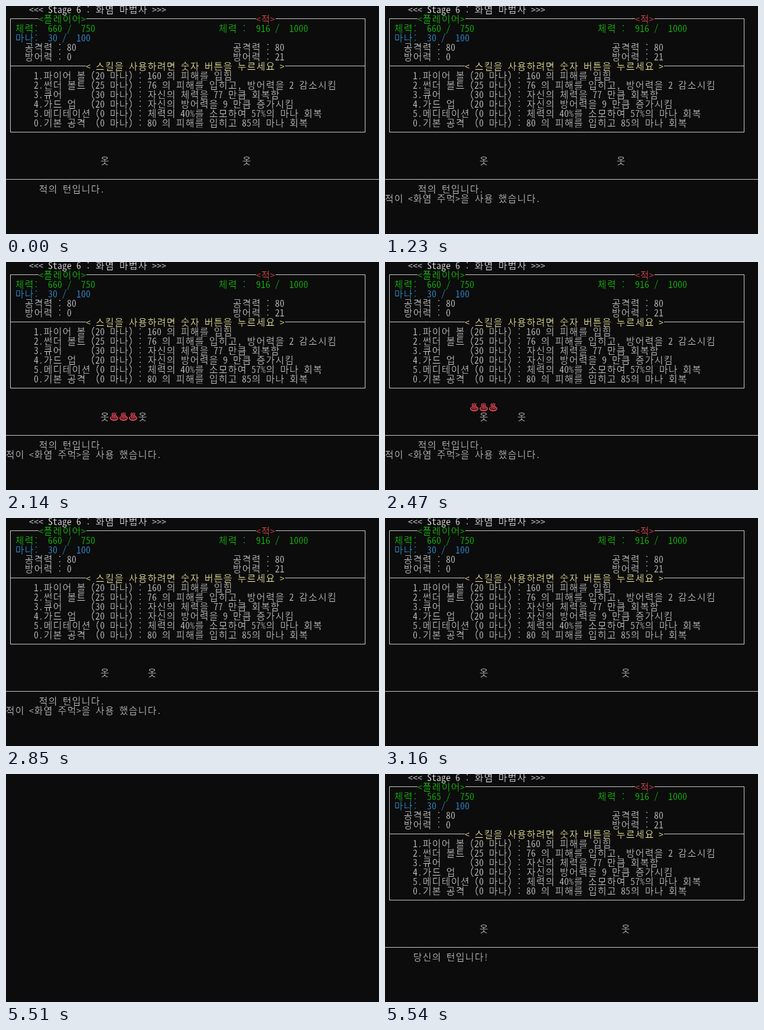
Animation, 631 px wide and 386 px high, one loop 5930 ms. Source, as an HTML page:

```html
<!DOCTYPE html>
<html lang="ko">
<head>
<meta charset="utf-8">
<title>Stage 6</title>
<style>
html, body { margin: 0; width: 100%; height: 100%; overflow: hidden; background: #0c0c0c; }
svg { display: block; }
text {
  font: 300 16px "Noto Sans Mono CJK KR", "Noto Sans CJK KR", "Noto Sans CJK", "Noto Sans Mono", monospace;
  text-anchor: middle;
  white-space: pre;
  stroke: #0c0c0c; /* thins the strokes to console weight */
  stroke-width: .25;
}
.flame { stroke: #e74856; stroke-width: .6; }
path { fill: none; stroke: #ccc; shape-rendering: crispEdges; }
</style>
</head>
<body>
<svg width="631" height="386" viewBox="0 0 631 386">
  <g id="screen">
    <path d="M7.5 213V21.5H55M136 21.5H423M456 21.5H607.5V213.5H7M8 101.5H135M472 101.5H607M0 293.5H631"/>
  </g>
</svg>
<script>
const CELL = 8, ROW = 16, LEFT = -1, BASELINE = 12, LOOP = 5930;
const GREY = '#cccccc', WHITE = '#f2f2f2', GREEN = '#16c60c', RED = '#e74856', BLUE = '#3a96dd', YELLOW = '#f9f1a5';
const screen = document.getElementById('screen');

// Console text: Latin takes one cell, Hangul and symbols take two.
function put(col, row, string, color = GREY) {
  const el = document.createElementNS('http://www.w3.org/2000/svg', 'text');
  let x = col * CELL + LEFT;
  const centers = [...string].map(ch => {
    const width = ch.charCodeAt(0) < 128 ? CELL : CELL * 2;
    x += width;
    return x - width / 2;
  });
  el.setAttribute('x', centers.join(' '));
  el.setAttribute('y', row * ROW + BASELINE);
  el.setAttribute('fill', color);
  el.textContent = string;
  screen.append(el);
  return el;
}

put(5, 0, '<<< Stage 6 : 화염 마법사 >>>', WHITE);
put(7, 1, '<플레이어>', GREEN);
put(53, 1, '<적>', RED);
put(2, 2, '체력:', GREEN);
put(13, 2, '/  750', GREEN);
put(45, 2, '체력 :  916 /  1000', GREEN);
put(2, 3, '마나:  30 /  100', BLUE);
put(4, 4, '공격력 : 80');
put(48, 4, '공격력 : 80');
put(4, 5, '방어력 : 0');
put(48, 5, '방어력 : 21');
put(17, 6, '< 스킬을 사용하려면 숫자 버튼을 누르세요 >', YELLOW);
[
  '1.파이어 볼 (20 마나) : 160 의 피해를 입힘',
  '2.썬더 볼트 (25 마나) : 76 의 피해를 입히고, 방어력을 2 감소시킴',
  '3.큐어      (30 마나) : 자신의 체력을 77 만큼 회복함',
  '4.가드 업   (20 마나) : 자신의 방어력을 9 만큼 증가시킴',
  '5.메디테이션 (0 마나) : 체력의 40%를 소모하여 57%의 마나 회복',
  '0.기본 공격  (0 마나) : 80 의 피해를 입히고 85의 마나 회복'
].forEach((skill, i) => put(6, 7 + i, skill));
put(20, 16, '옷');
const enemy = put(50, 16, '옷');

const flames = [[18, 17], [22, 16], [18, 15]].map(([col, row]) => {
  const el = put(col, row, '♨♨♨', RED);
  el.classList.add('flame');
  return el;
});

// Texts shown only from `start` to `end`.
const timed = [
  [put(9, 2, '660', GREEN), 0, 5510],
  [put(9, 2, '565', GREEN), 5510, LOOP],
  [put(7, 19, '적의 턴입니다.'), 0, 3160],
  [put(0, 20, '적이 <화염 주먹>을 사용 했습니다.'), 420, 3160],
  [put(0, 19, '95 만큼의 피해를 받았습니다.'), 3930, 5510],
  [put(0, 20, '방어력이 5 만큼 감소합니다.'), 4720, 5510],
  [put(6, 19, '당신의 턴입니다!'), 5510, LOOP]
];

const APPROACH = 1230, BURN = 1800, RETREAT = 2804, STRIDE = 22;
const show = (el, on) => { el.style.display = on ? '' : 'none'; };

function enemyOffset(t) {
  if (t < APPROACH) return 0;
  if (t < RETREAT) return Math.min(STRIDE, Math.floor((t - APPROACH) / 25.65) + 1);
  return Math.max(0, STRIDE - Math.floor((t - RETREAT) / 16.1));
}

function draw(t) {
  show(screen, t < 5510 || t >= 5540);
  enemy.setAttribute('transform', `translate(${-CELL * enemyOffset(t)} 0)`);
  const burning = t >= BURN && t < RETREAT;
  const phase = Math.floor((t - BURN) / 47.8) % flames.length;
  flames.forEach((el, i) => show(el, burning && i === phase));
  timed.forEach(([el, start, end]) => show(el, t >= start && t < end));
}

const begin = performance.now();
function tick() {
  draw((performance.now() - begin) % LOOP);
  requestAnimationFrame(tick);
}
tick();
</script>
</body>
</html>
```
